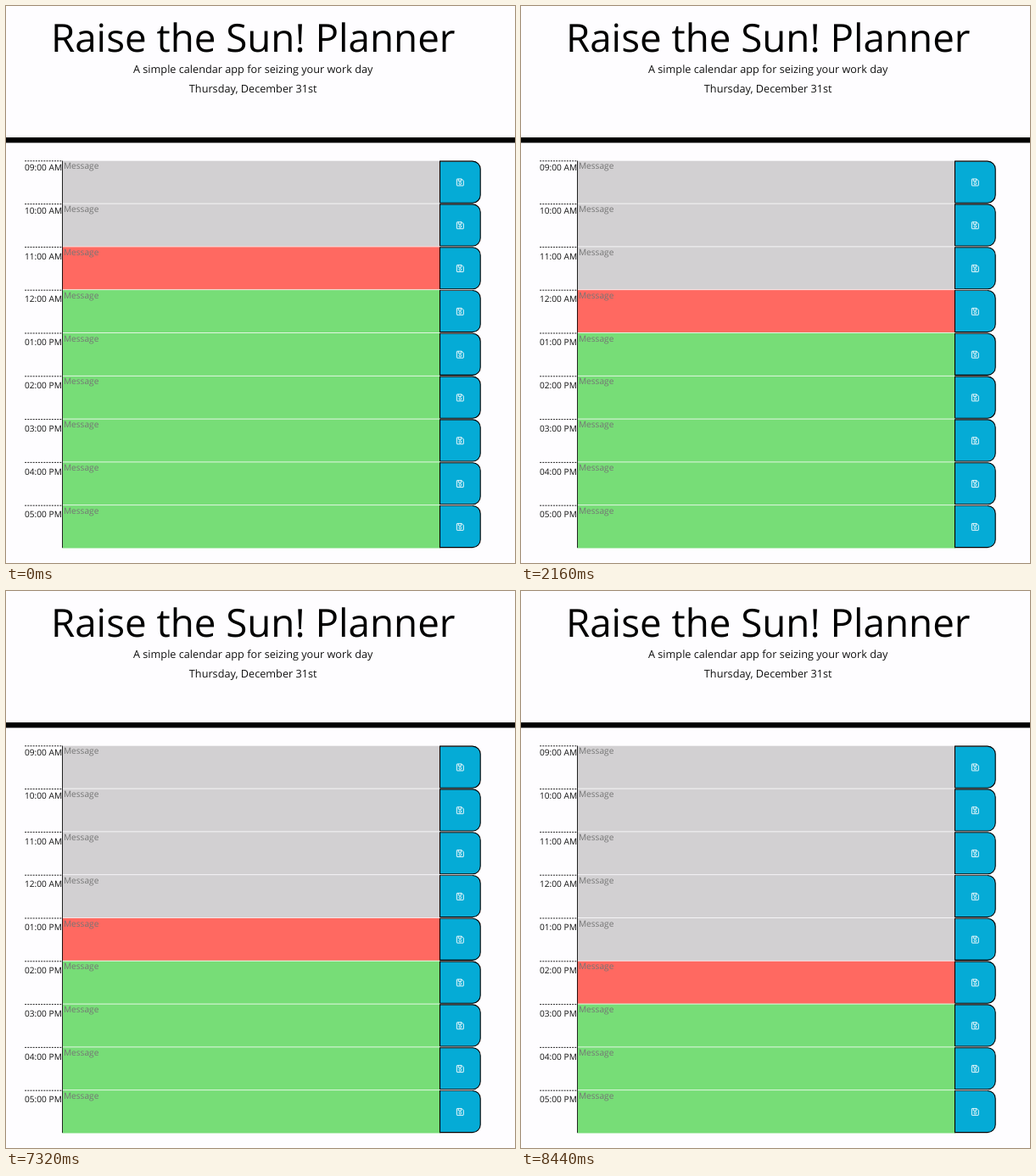
An HTML page for the animation above (9.52 s loop, 600x657 px).

```html
<!DOCTYPE html>
<html lang="en">
<head>
<meta charset="utf-8">
<title>Day planner</title>
<style>
  html, body { margin: 0; width: 100%; height: 100%; overflow: hidden; background: #fefdff; }
  svg { display: block; width: 600px; height: 657px; }
  text { font-family: "Open Sans", "Noto Sans", sans-serif; font-size: 10.16px; fill: #111; text-rendering: geometricPrecision; }
  .head text { text-anchor: middle; font-size: 12.7px; }
  .head .title { font-size: 45.72px; fill: #000; }
  .hint { fill: #757575; }
  .dash { stroke: #000; stroke-width: .9; stroke-dasharray: 1.9 1.27; }
  .button { fill: #05abd6; stroke: #000; stroke-width: 1.1; }
  .shine { fill: none; stroke: #4c4c4c; stroke-width: .9; }
  .icon { fill: none; stroke: #fff; stroke-width: 46; stroke-linejoin: round; }

  .page, .loaded, .now { animation: 9520ms step-end infinite; }
  .page { animation-name: shift; }
  .loaded { animation-name: load; }
  .now { animation-name: hours; }

  /* Reload: the date and colours are missing for a moment. */
  @keyframes shift {
    0%, 19.32%, 85.71%, 100% { transform: translateY(0); }
    18.9%, 85.29% { transform: translateY(-22.86px); }
  }
  @keyframes load {
    0%, 19.32%, 85.71%, 100% { opacity: 1; }
    18.9%, 85.29% { opacity: 0; }
  }
  /* One hour is one row of 50.8px. */
  @keyframes hours {
    0% { transform: translateY(101.6px); }
    19.32% { transform: translateY(152.4px); }
    64.7% { transform: translateY(203.2px); }
    85.71%, 100% { transform: translateY(254px); }
  }
</style>
</head>
<body>
<svg viewBox="0 0 600 657">
  <defs>
    <clipPath id="area"><rect x="66.8" y="182.5" width="444.4" height="456.7"/></clipPath>
    <g id="save">
      <path class="button" d="M511.5 183.1H550a9.2 9.2 0 0 1 9.2 9.2V223a9.2 9.2 0 0 1-9.2 9.2H511.5Z"/>
      <path class="shine" d="M512 183.1H550"/>
      <g class="icon" transform="translate(530.9 202.9) scale(.01984)">
        <path d="M48 56H316L424 164V432a24 24 0 0 1-24 24H48a24 24 0 0 1-24-24V80a24 24 0 0 1 24-24Z"/>
        <path d="M120 56V184H296V56"/>
        <circle cx="224" cy="320" r="68"/>
      </g>
    </g>
  </defs>
  <g class="head">
    <text class="title" x="291.2" y="54">Raise the Sun! Planner</text>
    <text x="291.2" y="79">A simple calendar app for seizing your work day</text>
    <text class="loaded" x="291.2" y="101.9">Thursday, December 31st</text>
  </g>
  <g class="page">
    <rect y="155" width="600" height="6.35"/>
    <g class="loaded">
      <g clip-path="url(#area)">
        <rect x="66" y="182" width="446" height="458" fill="#77dd77"/>
        <g class="now">
          <rect x="66" y="-275.2" width="446" height="457.2" fill="#d2d0d2"/>
          <rect x="66" y="182" width="446" height="50.8" fill="#ff6961"/>
        </g>
      </g>
    </g>
    <g id="rows"></g>
    <rect x="66.1" y="182.5" width=".85" height="456.7"/>
  </g>
</svg>
<script>
  const pitch = 50.8;
  const label = i => {
    const hour = i < 4 ? 9 + i : i - 3;
    return String(hour).padStart(2, "0") + ":00 " + (i < 4 ? "AM" : "PM");
  };
  const row = i => `<g transform="translate(0 ${i * pitch})">
    <rect x="66" y="181.9" width="446" height=".8" fill="#fefdff"/>
    <path class="dash" d="M22.2 182.8H66.4"/>
    <text x="22" y="${i < 2 ? 194.2 : 197}">${label(i)}</text>
    <text class="hint" x="67.9" y="192.4">Message</text>
    <use href="#save"/>
  </g>`;
  document.getElementById("rows").innerHTML = Array.from({ length: 9 }, (_, i) => row(i)).join("");
</script>
</body>
</html>
```
